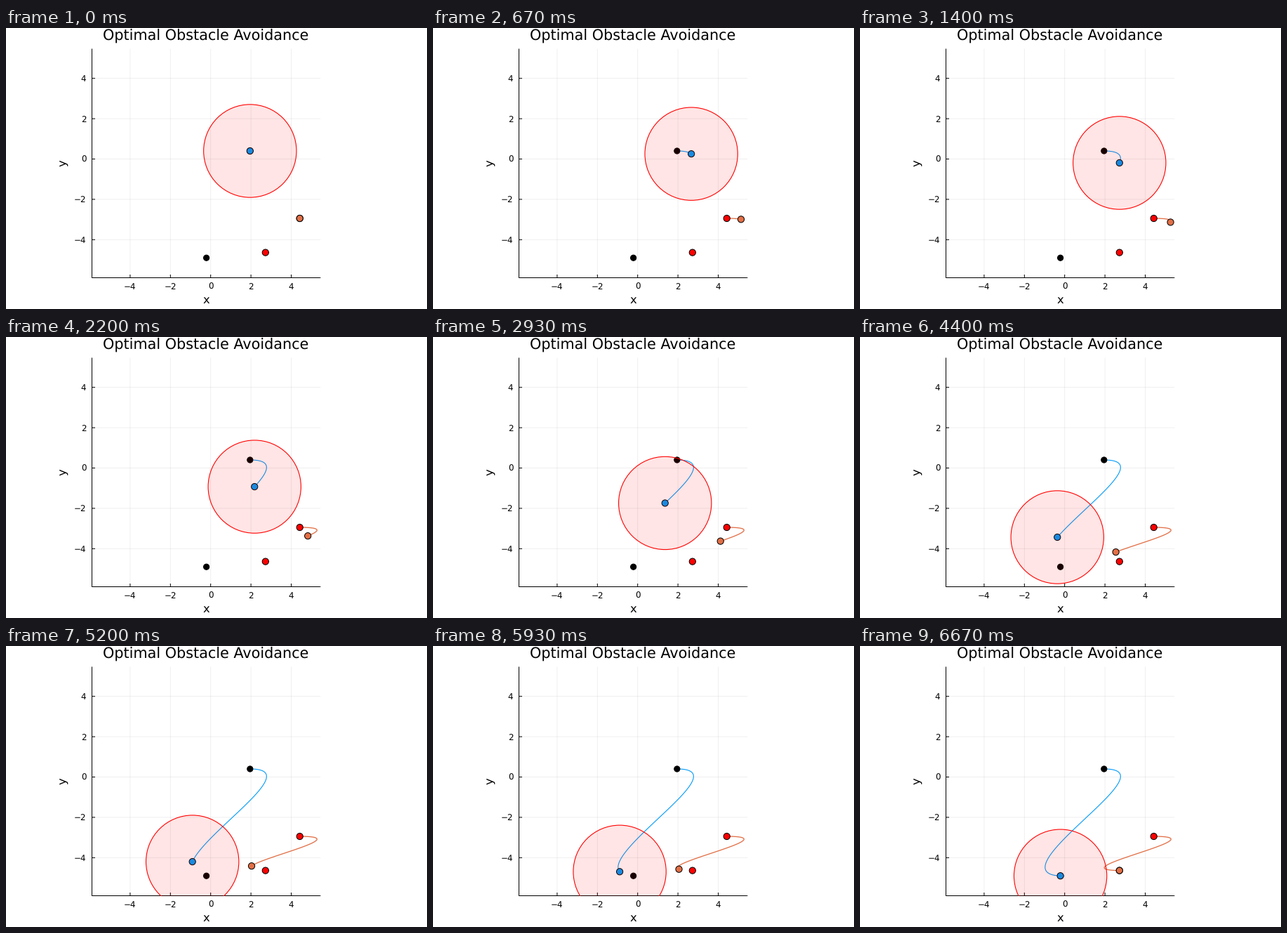
A matplotlib script that plays this animation: 600x400 px, repeating every 6.74 s.

```python
import numpy as np
import matplotlib.pyplot as plt
from matplotlib.animation import FuncAnimation
from matplotlib.patches import Circle, Rectangle

W, H, DPI = 600, 400, 100
STEPS, LOOP = 101, 6740
FRAMES = 2 * STEPS  # two drawn frames per simulation step
PX = 72 / DPI  # points per pixel
X0, Y0, UNIT = 291.7, 186.5, 28.7
LEFT, RIGHT, TOP, BOTTOM = 122.5, 447.8, 30, 355.5
BLUE, ORANGE = "#009AFA", "#E26F46"
RADIUS = 2.305 * UNIT

plt.rcParams["font.family"] = "DejaVu Sans"
plt.rcParams["text.hinting"] = "none"
fig = plt.figure(figsize=(W / DPI, H / DPI), dpi=DPI, facecolor="white")
ax = fig.add_axes([0, 0, 1, 1])
ax.set_xlim(0, W)
ax.set_ylim(H, 0)
ax.axis("off")
frame = Rectangle((LEFT, TOP), RIGHT - LEFT, BOTTOM + 0.4 - TOP,
                  transform=ax.transData)


def stroke(xs, ys, color="black", width=1.0, **kw):
    return ax.plot(xs, ys, color=color, lw=width * PX, snap=False, **kw)[0]


def label(x, y, text, size, **kw):
    kw = {"ha": "center", "va": "baseline", **kw}
    ax.text(x, y, text, fontsize=size * PX, color="black", **kw)


def dot(x, y, color, z, r=4.6):
    c = Circle((x, y), r, fc=color, ec="black", lw=1.0 * PX, zorder=z)
    ax.add_patch(c)
    c.set_clip_path(frame)
    return c


def path(start, end, bend, lag):
    """Swing out sideways in x, ease in and out in y."""
    s = np.linspace(0, 1, STEPS)
    u = s - 0.54
    x = start[0] + (end[0] - start[0]) * s + s * (1 - s) * np.polyval(bend, u)
    y = start[1] + (end[1] - start[1]) * s**2 * (3 - 2 * s)
    return x, y - lag * s**2 * (1 - s)


# axes, grid and text
for v in range(-4, 5, 2):
    gx, gy = X0 + v * UNIT, Y0 - v * UNIT
    grid = dict(color="black", width=0.8, alpha=0.08, zorder=1)
    stroke([gx, gx], [TOP, BOTTOM], **grid)
    stroke([LEFT, RIGHT], [gy, gy], **grid)
    stroke([gx, gx], [BOTTOM, BOTTOM - 4], zorder=2)
    stroke([LEFT, LEFT + 4], [gy, gy], zorder=2)
    name = str(v).replace("-", "\u2212")
    label(gx, 372, name, 11.9)
    label(114.4, gy + 4.4, name, 11.9, ha="right")
stroke([LEFT, LEFT], [TOP, BOTTOM], zorder=2)
stroke([LEFT, RIGHT], [BOTTOM, BOTTOM], zorder=2)
label(285, 18, "Optimal Obstacle Avoidance", 20.8)
label(285, 392, "x", 16.4)
label(90, 192.5, "y", 16.4, rotation=90, ha="right", va="center")

# the two agents
blue = path((347.8, 175.0), (285.6, 327.2), (68, -708, -29.8), 9.5)
orange = path((418.7, 271.0), (369.8, 319.6), (-673, -16.5), 3)

agents = []
for (xs, ys), color, width, mark, r in ((blue, BLUE, 1.1, "black", 4.1),
                                        (orange, ORANGE, 1.3, "red", 4.6)):
    trail = stroke([], [], color, width, zorder=3)
    trail.set_clip_path(frame)
    for i in (0, -1):
        dot(xs[i], ys[i], mark, 4, r)
    agents.append((xs, ys, trail, dot(xs[0], ys[0], color, 5)))

zone = Circle((blue[0][0], blue[1][0]), RADIUS, fc=(1, 0, 0, 0.1), ec="red",
              lw=1.1 * PX, zorder=6)
ax.add_patch(zone)
zone.set_clip_path(frame)


def update(n):
    k = min((n + 1) // 2, STEPS - 1)
    for xs, ys, trail, head in agents:
        trail.set_data(xs[:k + 1], ys[:k + 1])
        head.center = xs[k], ys[k]
    zone.center = blue[0][k], blue[1][k]
    return []


anim = FuncAnimation(fig, update, frames=FRAMES, interval=LOOP / FRAMES,
                     init_func=lambda: update(0), repeat=True, repeat_delay=0)
plt.show()
```
